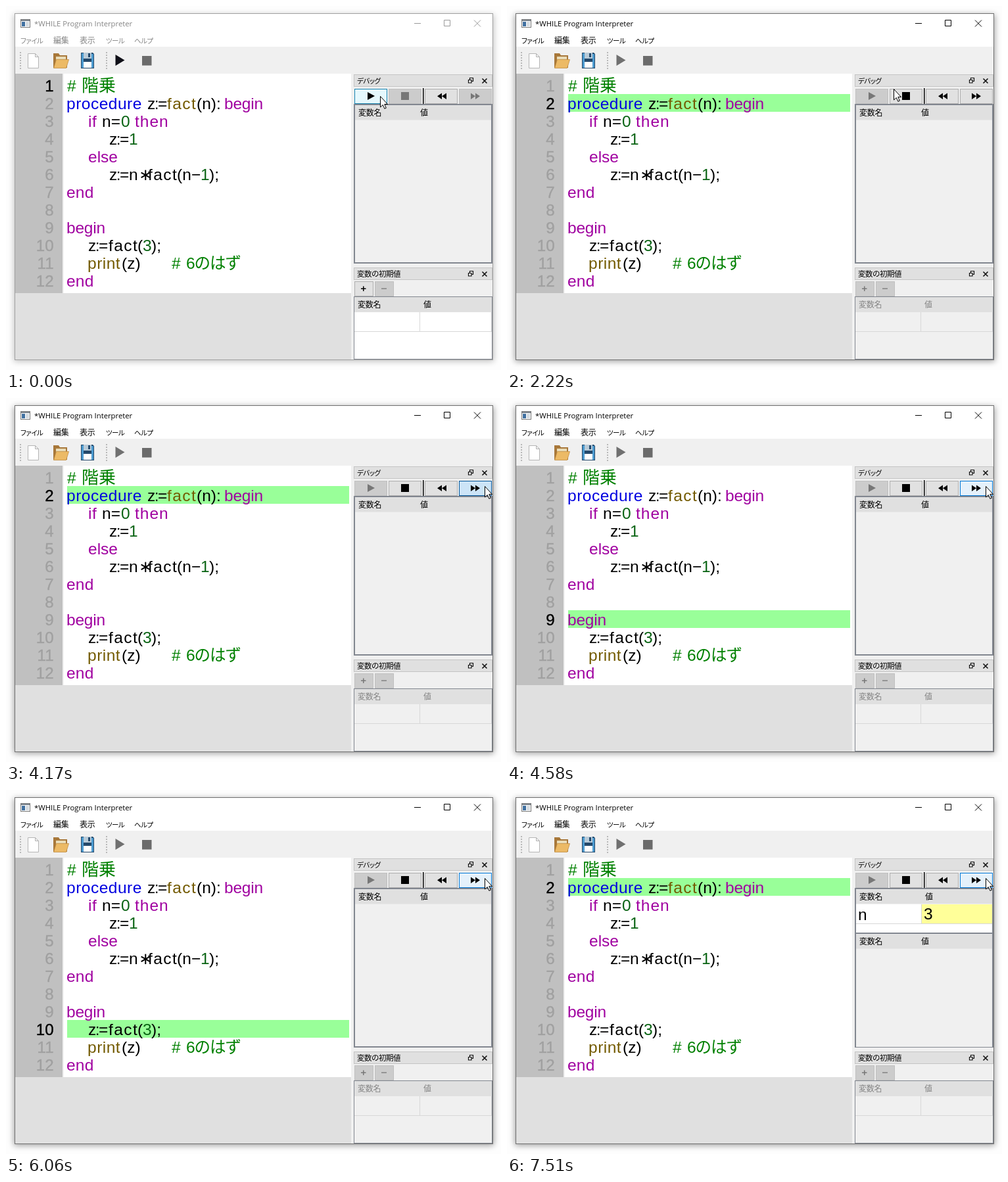
An HTML page that plays this animation: 753x554 px, repeating every 8 s.

```html
<!DOCTYPE html>
<html lang="ja">
<head>
<meta charset="utf-8">
<style>
html, body { margin: 0; width: 100%; height: 100%; overflow: hidden; background: #fdfdfd; }
svg { display: block; width: 753px; height: 554px; }
text { white-space: pre; }
.ja { font: 12px "Noto Sans CJK JP", "Noto Sans CJK", sans-serif; font-feature-settings: "palt"; letter-spacing: -.3px; }
.kana { font-size: 10.5px; letter-spacing: -.5px; }
.tight { font-size: 11.5px; letter-spacing: -.4px; }
.title { font: 11.3px "Open Sans", "Noto Sans", sans-serif; }
.code { font: 24.5px "Liberation Sans", "Noto Sans CJK JP", sans-serif; font-feature-settings: "palt"; }
.num { font: 24px "Liberation Sans", Arial, sans-serif; text-anchor: end; stroke-width: .4px; }
</style>
</head>
<body>
<svg id="stage" viewBox="0 0 753 554" xmlns="http://www.w3.org/2000/svg"></svg>
<script>
const GREEN = '#008000', BLUE = '#0000e0', PURPLE = '#a000a0', OLIVE = '#735a00', BLACK = '#000', DIGIT = '#0a6414';
const FRAME = '#828790';

const rect = (x, y, w, h, fill, more = '') =>
  `<rect x="${x}" y="${y}" width="${w}" height="${h}" fill="${fill}" ${more}/>`;
const box = (x, y, w, h, fill, line, more = '') =>
  rect(x + .5, y + .5, w - 1, h - 1, fill, `stroke="${line}" ${more}`);
const path = (d, fill, more = '') => `<path d="${d}" fill="${fill}" ${more}/>`;
const label = (x, y, s, cls = 'ja', more = '') => `<text x="${x}" y="${y}" class="${cls}" ${more}>${s}</text>`;
const lineTop = n => 107 + 27 * (n - 1);

// line, x, colour, text, letter spacing, size
const code = [
  [1, 93, GREEN, '#'], [1, 115, GREEN, '階乗', 0, 26],
  [2, 92, BLUE, 'procedure', .5], [2, 215, BLACK, 'z:=', -1.5], [2, 245, OLIVE, 'fact', 1.4],
  [2, 290, BLACK, '(n):'], [2, 332, PURPLE, 'begin', -.2],
  [3, 125, PURPLE, 'if', .5], [3, 146, BLACK, 'n='], [3, 175, DIGIT, '0'], [3, 196, PURPLE, 'then', 1],
  [4, 157, BLACK, 'z:=', -1.5], [4, 187, DIGIT, '1'],
  [5, 125, PURPLE, 'else'],
  [6, 157, BLACK, 'z:=', -1.5], [6, 187, BLACK, 'n'], [6, 202, BLACK, '∗'], [6, 216, BLACK, 'fact', 1.4],
  [6, 260, BLACK, '(n'], [6, 282, BLACK, '−'], [6, 296, DIGIT, '1'], [6, 309, BLACK, ');'],
  [7, 92, PURPLE, 'end', .2],
  [9, 92, PURPLE, 'begin', -.2],
  [10, 125, BLACK, 'z:=', -1.5], [10, 156, BLACK, 'fact', 1.4], [10, 200, BLACK, '('],
  [10, 208, DIGIT, '3'], [10, 221, BLACK, ');'],
  [11, 124, OLIVE, 'print', .5], [11, 176, BLACK, '(z)'], [11, 252, GREEN, '#'],
  [11, 274, GREEN, '6'], [11, 287, GREEN, 'のはず', -.5, 24.5],
  [12, 92, PURPLE, 'end', .2]
];
const codeText = code.map(([n, x, fill, s, gap = 0, size = 24.5]) =>
  label(x, lineTop(n) + 23, s, 'code', `fill="${fill}" style="letter-spacing:${gap}px;font-size:${size}px"`)).join('');

const numbers = Array.from({ length: 12 }, (_, i) =>
  label(72.5, lineTop(i + 1) + 23, i + 1, 'num', `id="num${i + 1}"`)).join('');

const grip = x => Array.from({ length: 7 }, (_, i) => rect(x, 70 + i * 4, 2, 2, '#b8b8b8')).join('');

const dock = (y, name, cls) =>
  box(529, y, 211, 19, '#e0e0e0', '#c4c4c4') + label(534, y + 14, name, cls) +
  path(`M705.5 ${y + 8}v-2.5h5v5h-2.5M703.5 ${y + 8.5}h4.5v4.5h-4.5z`, 'none', 'stroke="#111" stroke-width="1.2"') +
  path(`M724.5 ${y + 6.5}l7 7m0-7l-7 7`, 'none', 'stroke="#111" stroke-width="1.6"');

const button = (id, x, y, w, icon) =>
  `<g id="${id}">${box(x, y, w, 23, '#e1e1e1', '#adadad')}${path(icon, BLACK)}</g>`;

const header = (y, x) => rect(531, y, 207, 22, '#e0e0e0') + label(536, y + 15.5, '変数名') + label(x, y + 15.5, '値');

const toolIcons =
  path('M33.5 72.5h11l5 5v17h-16zM44.5 72.5v5h5', '#fff', 'stroke="#b5b5b5"') +
  path('M72 72h8l2 3h11v19h-21z', '#a8783a') + rect(76, 77, 15, 6, '#e9dcb8') +
  path('M72.5 94.5l4-13h19l-4 13z', '#ecba66', 'stroke="#c08d42" stroke-width=".8"') +
  path('M114 71h18l2 2v22h-20z', '#25496b') + rect(115, 72, 3, 22, '#4c9bd0') + rect(130, 73, 3, 21, '#4c9bd0') +
  rect(118, 71, 12, 9, '#b9cbd8') + rect(125, 72, 3, 6, '#25496b') + rect(118, 85, 12, 9, '#fff');

document.getElementById('stage').innerHTML = `
<defs>
  <filter id="blur" x="-5%" y="-5%" width="110%" height="110%"><feGaussianBlur stdDeviation="5"/></filter>
  <clipPath id="tableClip">${rect(530, 150, 209, 241, BLACK)}</clipPath>
  <clipPath id="frameClip"><rect id="frameBox" x="530" y="150" width="209" height="0"/></clipPath>
</defs>
${rect(0, 0, 753, 554, '#fdfdfd')}
${rect(12, 13, 730, 528, BLACK, 'id="shadow" filter="url(#blur)"')}
${box(13, 11, 728, 528, '#f0f0f0', '#8a8a8a', 'id="window"')}
${rect(14, 12, 726, 50, '#fff')}
${box(22, 20, 15, 13, '#fff', '#777')}${rect(23, 21, 13, 2, '#7e8790')}${rect(24, 24, 5, 7, '#3f6f9f')}${rect(30, 24, 5, 7, '#d5dbe0')}
<g id="chrome">
  ${label(43, 31, '*WHILE Program Interpreter', 'title')}
  ${label(22, 56.5, 'ファイル', 'ja kana')}${label(72, 56.5, '編集')}${label(112, 56.5, '表示')}
  ${label(152, 56.5, 'ツール', 'ja kana')}${label(195, 56.5, 'ヘルプ', 'ja kana')}
</g>
${path('M621 26.5h10M666.5 21.5h9v9h-9zM712 21.5l10 10m0-10l-10 10', 'none', 'id="controls"')}
${grip(21)}${grip(152)}${toolIcons}
${path('M166.5 74v17l14-8.5z', BLACK, 'id="run"')}${rect(207, 76, 14.5, 14.5, '#6b6b6b')}

${rect(14, 103, 72, 334, '#c0c0c0')}${rect(88, 103, 437, 334, '#fff')}${rect(14, 437, 511, 101, '#e0e0e0')}
${rect(93, 0, 429, 27, '#ccffcc', 'id="trail"')}${rect(93, 0, 429, 27, '#99ff99', 'id="mark"')}
${numbers}${codeText}

${dock(104, 'デバッグ', 'ja kana')}
${button('play', 530, 126, 50, 'M550 131v12l11-6z')}
${button('stop', 582, 126, 50, 'M601 131h12v12h-12z')}
${rect(634, 125, 1.5, 24, BLACK)}
${button('back', 637, 126, 50, 'M663 132.5v9.5l-7-4.75zM670 132.5v9.5l-7-4.75z')}
${button('next', 689, 126, 50, 'M707 132.5v9.5l7-4.75zM714 132.5v9.5l7-4.75z')}
${box(529, 149, 211, 243, '#f0f0f0', FRAME)}
<g clip-path="url(#tableClip)">
  <g id="frame" clip-path="url(#frameClip)">
    ${box(530, 150, 209, 68, '#fff', FRAME)}${header(151.5, 636)}
    ${rect(630, 174, 108, 29, '#ffff99', 'id="value"')}
    ${rect(531, 203, 207, 1, '#d8d8d8')}${rect(630, 174, 1, 30, '#d8d8d8')}
    ${label(534, 198, 'n', 'code')}${label(634, 197, '3', 'code')}
    ${path('M626 173l8-6h105v6z', '#f0ec4c', 'id="wedge"')}
  </g>
  <g id="globals">${box(530, 150, 209, 241, '#f0f0f0', FRAME)}${header(151.5, 630)}</g>
</g>

${dock(398, '変数の初期値', 'ja tight')}
${button('add', 530, 419, 29, 'M540 429.5h3v-3h1.5v3h3v1.5h-3v3h-1.5v-3h-3z')}
${button('del', 561, 419, 29, 'M571 429.5h8v1.3h-8z')}
${box(529, 442, 211, 96, '#fff', FRAME, 'id="initBody"')}
${rect(530, 443, 209, 23, '#e0e0e0')}
<g id="initHead">${label(535, 459, '変数名')}${label(635, 459, '値')}</g>
${path('M530 495.5h209M629.5 466v29M738.5 466v29', 'none', 'stroke="#d8d8d8"')}
${path('M0 0V16.5L3.8 13 6.4 18.8 8.8 17.7 6.3 12H11z', '#fff', 'id="cursor" stroke="#000" stroke-width="1"')}`;

const $ = id => document.getElementById(id);
const set = (node, attrs) => { for (const k in attrs) node.setAttribute(k, attrs[k]); };
const show = (id, on) => set($(id), { visibility: on ? 'visible' : 'hidden' });
const ramp = (t, a, b) => Math.min(1, Math.max(0, (t - a) / (b - a)));
const mix = (a, b, k) => '#' + [1, 3, 5].map(i => {
  const u = parseInt(a.substr(i, 2), 16), v = parseInt(b.substr(i, 2), 16);
  return Math.round(u + (v - u) * k).toString(16).padStart(2, '0');
}).join('');

const LOOK = {
  normal: ['#e1e1e1', '#adadad'], off: ['#cccccc', '#bfbfbf'], hover: ['#e5f1fb', '#0078d7'],
  pressed: ['#cce4f7', '#005499'], focus: ['#e5f8fd', '#1683b0']
};
function paint(id, from, to = from, k = 1, on = true) {
  const [body, icon] = $(id).children;
  set(body, { fill: mix(LOOK[from][0], LOOK[to][0], k), stroke: mix(LOOK[from][1], LOOK[to][1], k) });
  set(icon, { fill: on ? '#000000' : '#777777' });
}

// debugger steps: time, active line, line left fading
const START = 1410, CALL = 7050;
const steps = [[START, 2, 0], [4230, 9, 2], [5710, 10, 9], [CALL, 2, 9]];
const clicks = [4030, 5510, 6850];

function drawLines(t) {
  let line = 0, trail = 0, number = 1;
  for (const [at, to, old] of steps) {
    if (t < at) break;
    line = to;
    trail = t < at + 60 ? old : 0;
    if (t >= at + 60 || !old) number = to;
  }
  show('mark', line);
  show('trail', trail);
  set($('mark'), { y: lineTop(line) });
  set($('trail'), { y: lineTop(trail) });
  for (let n = 1; n <= 12; n++) {
    const c = n === number ? '#000' : '#a0a0a0';
    set($('num' + n), { fill: c, stroke: c });
  }
}

function drawButtons(t, live) {
  if (live) paint('play', 'pressed', 'off', ramp(t, START, 1690), false);
  else paint('play', 'focus', 'pressed', ramp(t, 1210, 1350));
  paint('stop', 'off', 'normal', ramp(t, START, 1650), live);
  paint('back', 'normal');
  const click = clicks.find(c => t >= c && t < c + 550);
  if (t < 3030) paint('next', 'off', 'normal', ramp(t, START, 1650), live);
  else if (click === undefined) paint('next', 'normal', 'hover', ramp(t, 2970, 3170));
  else if (t < click + 270) paint('next', 'hover', 'pressed', ramp(t, click - 60, click + 140));
  else paint('next', 'pressed', 'hover', ramp(t, click + 270, click + 540));
  paint('add', 'normal', 'off', ramp(t, START, 1690), !live);
  paint('del', 'off', 'off', 1, false);
}

function drawCursor(t) {
  let x = 569, y = 137;
  if (t >= 2220) {
    const k = Math.min(1, Math.floor((t - 2220) / 67.2) / 11);
    const e = 1 - (1 - k) ** 1.5, q = 1 - e;
    x = q * q * 588 + 2 * q * e * 650 + e * e * 728;
    y = q * q * 126 + 2 * q * e * 78 + e * e * 134;
  }
  set($('cursor'), { transform: `translate(${x + .5} ${y + .5})` });
}

function drawFrames(t) {
  const k = ramp(t, CALL + 60, 7500);
  const depth = t < CALL ? 0 : 23 + 45 * (1 - (1 - k) ** 2);
  show('frame', depth);
  show('wedge', t < CALL + 60);
  set($('frameBox'), { height: depth });
  set($('globals'), { transform: `translate(0 ${depth})` });
  set($('value'), { fill: mix('#f0ec4c', '#ffff99', k) });
}

function draw(t) {
  const active = t >= 1210, live = t >= START;
  set($('shadow'), { opacity: active ? .38 : .24 });
  set($('window'), { stroke: active ? '#707070' : '#a0a0a0' });
  set($('chrome'), { fill: active ? '#000' : '#858585' });
  set($('controls'), { stroke: active ? '#000' : '#999' });
  set($('run'), { fill: live ? '#707070' : '#101018' });
  set($('initBody'), { fill: live ? '#f0f0f0' : '#fff' });
  set($('initHead'), { fill: live ? '#858585' : '#000' });
  drawLines(t);
  drawButtons(t, live);
  drawCursor(t);
  drawFrames(t);
}

const begin = performance.now();
function tick() {
  draw((performance.now() - begin) % 8000);
  requestAnimationFrame(tick);
}
tick();
</script>
</body>
</html>
```
